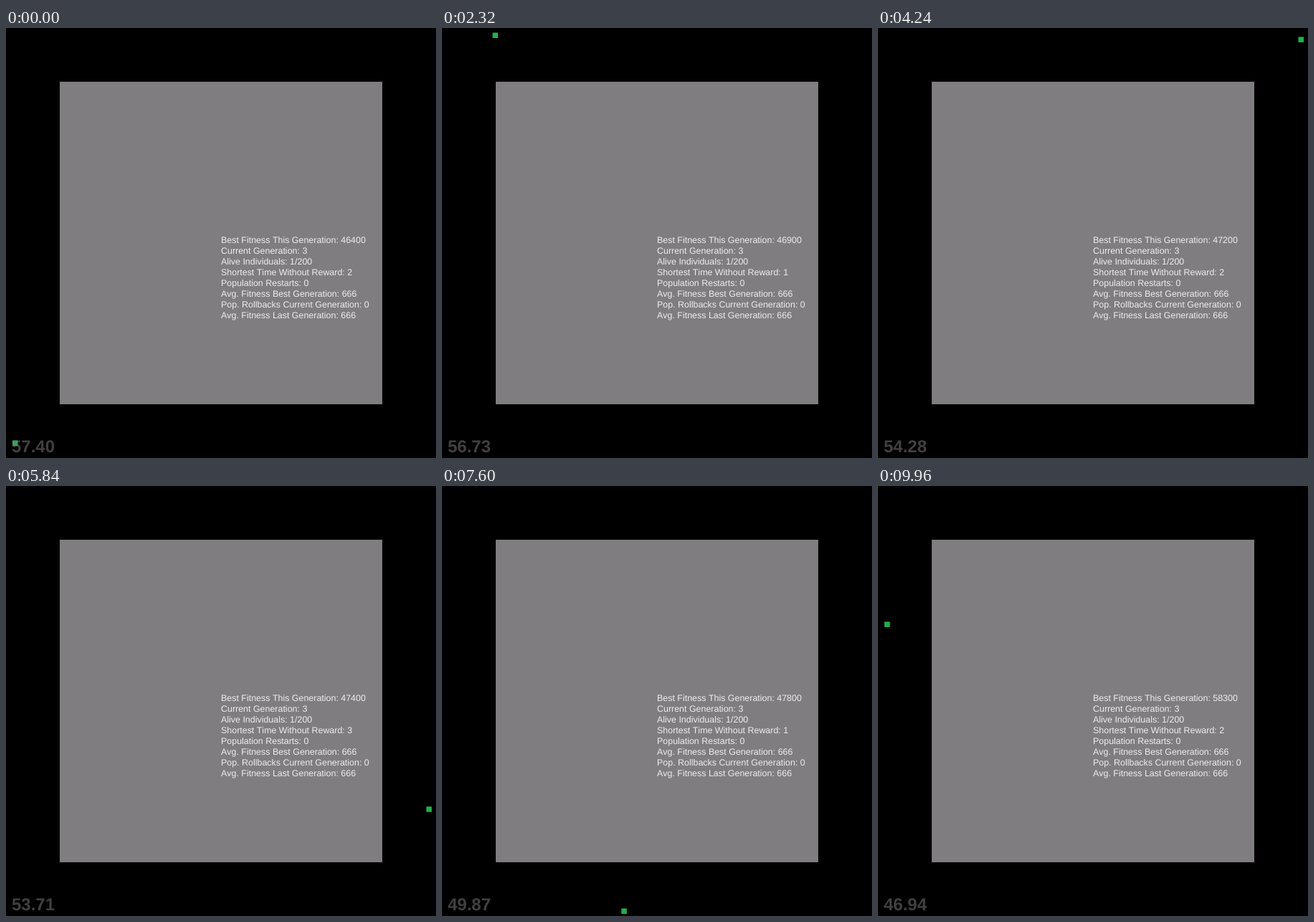
An HTML page for the animation above (10 s loop, 600 by 600 pixels).

```html
<!DOCTYPE html>
<html lang="en">
<head>
<meta charset="utf-8">
<title>Evolving driver</title>
<style>
  html, body { margin: 0; width: 100%; height: 100%; overflow: hidden; background: #000; }
  svg { display: block; width: 600px; height: 600px; }
  text {
    font-family: "Liberation Sans", Arial, sans-serif;
    font-kerning: none;
    text-rendering: geometricPrecision;
    white-space: pre;
  }
  #stats { font-size: 12.45px; fill: #fff; fill-opacity: .86; }
  #fps { font-size: 24px; font-weight: bold; fill: rgb(127, 127, 127); fill-opacity: .5; }
</style>
</head>
<body>
<svg viewBox="0 0 600 600">
  <rect width="600" height="600" fill="#000"/>
  <rect x="75" y="75" width="450" height="450" fill="#807d80"/>
  <g id="stats"></g>
  <rect id="car" width="7.5" height="7.5" fill="#22b14c"/>
  <text id="fps" x="8" y="592"></text>
</svg>
<script>
const LOOP = 10000, STEP = 40;

// The car circles this rectangle clockwise at constant speed.
const LEFT = 9, TOP = 6.5, RIGHT = 586.5, BOTTOM = 589.5;
const W = RIGHT - LEFT, H = BOTTOM - TOP, LAP = 2 * (W + H);
const SPEED = .2718;    // px per ms
const HEAD_START = 14;  // px already driven up the left side

// Reward gates: [how many, over what distance], from the finish line on.
const FINISH = 80;      // px the car is past the line at the start
const spans = [[3, 355], [4, 580], [3, 590], [4, 580], [2, 215]];
const IDLE_UNIT = 38;   // px driven per count without reward

// Frame rate readings: [seconds, value], refreshed every quarter second.
const rates = [[0, 57.40], [1.25, 55.62], [3, 57.57], [4, 54.28], [5.75, 53.71], [7.5, 49.87], [9.75, 46.94]];

const $ = id => document.getElementById(id);

function carAt(d) {
  if (d < H) return [LEFT, BOTTOM - d];
  if ((d -= H) < W) return [LEFT + d, TOP];
  if ((d -= W) < H) return [RIGHT, TOP + d];
  return [RIGHT - (d - H), BOTTOM];
}

// Gates passed since the line, and the distance since the latest one.
function gatesAt(d) {
  let passed = 0;
  for (const [count, length] of spans) {
    if (d < length) {
      const gap = length / count;
      return [passed + Math.floor(d / gap), d % gap];
    }
    d -= length;
    passed += count;
  }
  return [passed, d];
}

function frameRate(t) {
  const s = Math.floor(t / 250) / 4;
  const i = Math.max(1, rates.findIndex(r => r[0] >= s));
  const [t0, a] = rates[i - 1], [t1, b] = rates[i];
  return a + (b - a) * (s - t0) / (t1 - t0);
}

const lines = Array.from({ length: 8 }, (_, i) => {
  const el = document.createElementNS("http://www.w3.org/2000/svg", "text");
  el.setAttribute("x", 300);
  el.setAttribute("y", 300 + 15 * i);
  return $("stats").appendChild(el);
});

function draw(t) {
  const driven = t * SPEED;
  const [x, y] = carAt((driven + HEAD_START) % LAP);
  $("car").setAttribute("x", x);
  $("car").setAttribute("y", y);

  const fromLine = driven + FINISH;
  const laps = Math.floor(fromLine / LAP);
  const [passed, since] = gatesAt(fromLine % LAP);
  const fitness = 46400 + laps * 11600 + passed * 100;
  [
    `Best Fitness This Generation: ${fitness}`,
    "Current Generation: 3",
    "Alive Individuals: 1/200",
    `Shortest Time Without Reward: ${Math.floor(since / IDLE_UNIT)}`,
    "Population Restarts: 0",
    "Avg. Fitness Best Generation: 666",
    "Pop. Rollbacks Current Generation: 0",
    "Avg. Fitness Last Generation: 666"
  ].forEach((s, i) => { lines[i].textContent = s; });

  $("fps").textContent = frameRate(t).toFixed(2);
}

let start;
function tick(now) {
  start ??= now;
  const t = Math.max(0, now - start) % LOOP;
  draw(Math.floor(t / STEP) * STEP);
  requestAnimationFrame(tick);
}
draw(0);
requestAnimationFrame(tick);
</script>
</body>
</html>
```
